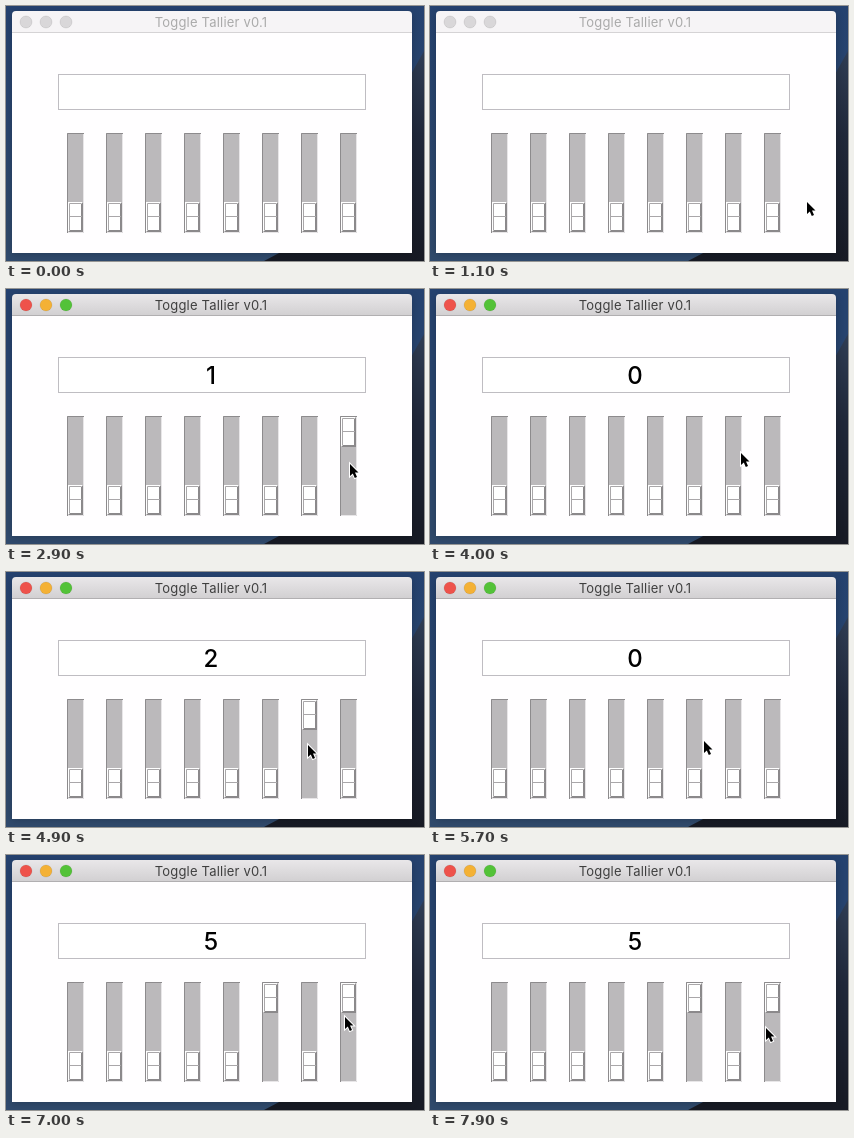
Animation, 418 px wide and 255 px high, one loop 8000 ms. Source, as an HTML page:

```html
<!DOCTYPE html>
<html lang="en">
<head>
<meta charset="utf-8">
<title>Toggle Tallier</title>
<style>
  html, body { margin: 0; width: 100%; height: 100%; overflow: hidden; background: #29426a; }
  svg { display: block; width: 418px; height: 255px; }
  text { text-anchor: middle; font-family: Inter, Roboto, sans-serif; }
  #title { font-size: 13px; letter-spacing: .2px; fill: #3f3f3f; }
  #value { font-size: 24px; font-weight: 500; fill: #000; }
  #bar { fill: url(#active); }
  .light { stroke: #0002; stroke-width: .6; }
  .inactive #bar { fill: #f6f4f6; }
  .inactive #title { fill: #aaa; }
  .inactive .light { fill: #d9d7d9; }
  .inactive #edge { stroke: #d5d3d5; }
</style>
</head>
<body>
<svg id="stage" viewBox="0 0 418 255">
  <defs>
    <linearGradient id="sea" x2="0" y2="1">
      <stop offset="0" stop-color="#25426f"/>
      <stop offset=".5" stop-color="#2a456d"/>
      <stop offset="1" stop-color="#304a6c"/>
    </linearGradient>
    <linearGradient id="cliff" x2="0" y2="1">
      <stop offset="0" stop-color="#2f3d54"/>
      <stop offset=".4" stop-color="#20283a"/>
      <stop offset="1" stop-color="#171a24"/>
    </linearGradient>
    <linearGradient id="active" x2="0" y2="1">
      <stop offset="0" stop-color="#e9e7e9"/>
      <stop offset="1" stop-color="#d1cfd1"/>
    </linearGradient>
    <filter id="blur" x="-10%" y="-10%" width="120%" height="120%"><feGaussianBlur stdDeviation="4"/></filter>
    <g id="knob">
      <rect width="15" height="30" fill="#8b898b"/>
      <path d="M0 30V0H15L13 2V28H2Z" fill="#fff"/>
      <path d="M1.5 28V1.5H13M1 14.5H14" fill="none" stroke="#a9a7a9"/>
    </g>
  </defs>

  <rect width="418" height="255" fill="url(#sea)"/>
  <path d="M418 45L404 70V246H275L258 255H418Z" fill="url(#cliff)"/>
  <rect x="6" y="8" width="400" height="240" fill="#000" opacity=".2" filter="url(#blur)"/>

  <rect x="6" y="20" width="400" height="227" fill="#fffeff"/>
  <path id="bar" d="M6 27V9Q6 5 10 5H402Q406 5 406 9V27Z"/>
  <path id="edge" d="M6 26.5H406" stroke="#b1afb1"/>
  <circle class="light" cx="20" cy="16" r="6" fill="#ee524b"/>
  <circle class="light" cx="40" cy="16" r="6" fill="#f4b135"/>
  <circle class="light" cx="60" cy="16" r="6" fill="#53c238"/>
  <text id="title" x="205" y="21">Toggle Tallier v0.1</text>

  <rect x="52.5" y="68.5" width="307" height="35" fill="#fff" stroke="#bfbdc2"/>
  <text id="value" x="205" y="95"></text>
  <g id="sliders"></g>
  <path id="cursor" d="M1 2V14L3.8 11.4 5.8 16 8 15 6 10.6H9.5Z"
        fill="#000" stroke="#fff" stroke-width="2" paint-order="stroke"/>
</svg>
<script>
const LOOP = 8000, STEP = 100, APPEAR = 1000, ACTIVATE = 2000, BITS = 8, HOP = 600;
const $ = id => document.getElementById(id);

// Each click flips one bit; the counter shows the sum.
const clicks = [
  { at: 2600, bit: 0 }, { at: 3500, bit: 0 },
  { at: 4500, bit: 1 }, { at: 5300, bit: 1 },
  { at: 6200, bit: 2 }, { at: 7000, bit: 0 }
];

// Where the pointer comes to rest, and when it gets there.
const rests = [
  { at: 1100, x: 376, y: 194 }, { at: 1900, x: 338, y: 204 },
  { at: 2900, x: 345, y: 174 }, { at: 3400, x: 339, y: 171 },
  { at: 4300, x: 300, y: 159 }, { at: 5000, x: 301, y: 171 },
  { at: 6000, x: 264, y: 165 }, { at: 6900, x: 338, y: 160 },
  { at: 7900, x: 335, y: 171 }
];

const knobs = Array.from({ length: BITS }, (_, i) => {
  const x = 61 + 39 * i;
  $('sliders').insertAdjacentHTML('beforeend', `
    <rect x="${x}" y="127" width="17" height="100" fill="#bbb9bb"/>
    <path d="M${x + .5} 227V127.5H${x + 17}" fill="none" stroke="#8d8b8d"/>
    <path d="M${x + 1} 226.5H${x + 16.5}V128" fill="none" stroke="#e8e6e8"/>
    <use href="#knob" x="${x + 1}"/>`);
  return $('sliders').lastElementChild;
});

const easeOut = k => 1 - (1 - k) ** 2;

function pointerAt(t) {
  let { x, y } = rests[0];
  for (const rest of rests) {
    const k = easeOut(Math.min(1, Math.max(0, (t - rest.at) / HOP + 1)));
    x += (rest.x - x) * k;
    y += (rest.y - y) * k;
  }
  return [Math.round(x), Math.round(y)];
}

function draw(now) {
  const t = Math.floor(now % LOOP / STEP) * STEP;
  const done = clicks.filter(click => click.at <= t);
  const value = done.reduce((sum, click) => sum ^ 1 << click.bit, 0);

  $('stage').classList.toggle('inactive', t < ACTIVATE);
  $('value').textContent = done.length ? value : '';
  knobs.forEach((knob, i) => knob.setAttribute('y', value >> (BITS - 1 - i) & 1 ? 128 : 196));
  $('cursor').style.display = t < APPEAR ? 'none' : '';
  $('cursor').setAttribute('transform', `translate(${pointerAt(t)})`);
}

const start = performance.now();
function tick() {
  draw(performance.now() - start);
  requestAnimationFrame(tick);
}
tick();
</script>
</body>
</html>
```
